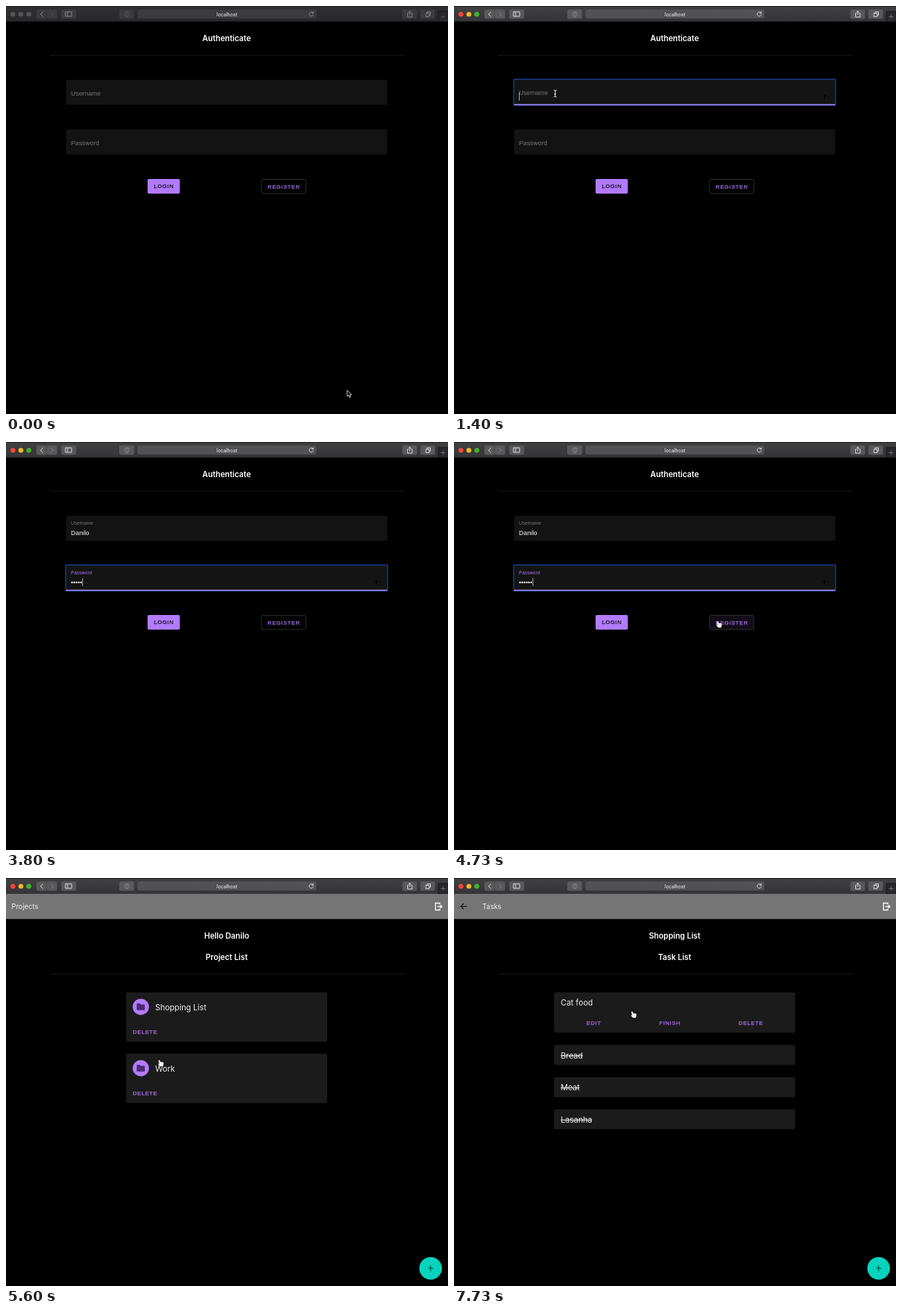
An HTML page that plays this animation: 640x592 px, repeating every 8 s.

```html
<!DOCTYPE html>
<html lang="en">
<head>
<meta charset="utf-8">
<title>Login and task list</title>
<style>
  html, body { margin: 0; width: 100%; height: 100%; overflow: hidden; background: #000; }
  svg { display: block; width: 640px; height: 592px; }
  text { font-family: Inter, sans-serif; fill: #fff; white-space: pre; }
  #bar { --bg1: #303033; --bg2: #29292b; --btn: #3b3b3d; --icon: #88888a; --url: #3c3c3e; }
  #bar.active { --bg1: #414144; --bg2: #343437; --btn: #59595b; --icon: #dededf; --url: #525255; }
  .btn { fill: var(--btn); }
  .icon { fill: none; stroke: var(--icon); stroke-width: 1; }
  .dim { opacity: .35; }
  .head { font-size: 11.3px; font-weight: 600; text-anchor: middle; }
  .title { font-size: 11.5px; fill: #eee; }
  .bartitle { font-size: 10.1px; fill: #f0f0f0; }
  .form { font: 9.33px "Liberation Sans", Arial, sans-serif; }
  .action { font: 8.1px "Liberation Sans", Arial, sans-serif; letter-spacing: .72px; fill: #a974ec; stroke: #a974ec; stroke-width: .25; }
  .mid { text-anchor: middle; }
  .done { text-decoration: line-through; }
</style>
</head>
<body>
<svg id="stage" viewBox="0 0 640 592"></svg>
<script>
const PURPLE = '#b27bff', LOOP = 8000, FPS = 15;
const $ = id => document.getElementById(id);
const rect = (x, y, w, h, fill, r = 0, more = '') =>
  `<rect x="${x}" y="${y}" width="${w}" height="${h}" rx="${r}" fill="${fill}" ${more}/>`;
const text = (x, y, cls, s, more = '') => `<text x="${x}" y="${y}" class="${cls}" ${more}>${s}</text>`;
const path = (d, cls = 'icon') => `<path d="${d}" class="${cls}"/>`;
const divider = y => rect(64, y, 512, 1, '#181818');
const card = (x, y, w, h) => rect(x, y, w, h, '#1b1b1b', 2);

const toolbar = () => `<g id="bar">
  <linearGradient id="shade" x2="0" y2="1">
    <stop style="stop-color:var(--bg1)"/><stop offset="1" style="stop-color:var(--bg2)"/>
  </linearGradient>
  ${rect(0, 0, 640, 22.5, 'url(#shade)')}${rect(0, 0, 640, 1, '#1c1c1e')}
  ${[10, 21.5, 33].map((x, i) => `<circle class="light" cx="${x}" cy="12" r="3.6" data-on="${['#f4453c', '#eeb526', '#43b32d'][i]}"/>`).join('')}
  ${[[44, 14.5], [59, 15], [80, 21.5], [164, 21.5], [574, 21], [600, 21]].map(([x, w]) => `<rect class="btn" x="${x}" y="5" width="${w}" height="13.5" rx="2"/>`).join('')}
  <rect x="190.5" y="5" width="259" height="13" rx="2.2" style="fill:var(--url)"/>
  ${path('M53.5 8.5 50 12l3.5 3.5')}${path('M65 8.5l3.5 3.5-3.5 3.5', 'icon dim')}
  ${path('M86 8.5h9v6.5h-9zM89 8.5v6.5')}
  ${path('M175 8.3l3 1v3q0 2.3-3 3.6q-3-1.3-3-3.6v-3zM175 8.5v7', 'icon dim')}
  ${path('M444.5 10a3 3 0 1 0 .5 2.2M445 8v2.4h-2.4')}
  ${path('M583 10.5h-1.5v5.5h6.5v-5.5h-1.5M584.7 13V7.5M582.8 9.2l1.9-1.9 1.9 1.9')}
  ${path('M608 10.5h4.8v5H608zM609.7 10.5v-2h4.8v5h-1.7')}
  ${rect(626, 8, 14, 14.5, '#29292b', 0, 'stroke="#171719"')}
  ${path('M629.5 15.5h7M633 12v7', 'icon dim')}
  ${text(320, 14.6, 'mid', 'localhost', 'font-size="7"')}
</g>`;

const field = (id, y) => `
  ${rect(87, y, 465, 36.5, '#131313', 1.5)}
  <g id="${id}Focus">
    <rect id="${id}Ring" fill="#141414" stroke="#15398b" stroke-width="1.6"/>
    <rect id="${id}Line" y="${y + 35.3}" height="1.7" fill="#9f85ef"/>
    <circle cx="536.5" cy="${y + 23.5}" r="1.8"/>
    <path d="M536.5 ${y + 24}v4M540.5 ${y + 23.5}l1.7 1.7 1.7-1.7" stroke="#000" fill="none"/>
  </g>
  ${text(0, 0, 'form', id, `id="${id}Label"`)}
  ${text(94, y + 27.7, 'form', '', `id="${id}Value"`)}
  <rect id="${id}Caret" y="${y + 18.5}" width=".8" height="11.5" fill="#ddd"/>`;

const loginPage = () => `<g id="login">
  ${text(319.5, 51.3, 'head', 'Authenticate')}${divider(71)}
  ${field('Username', 107)}${field('Password', 179)}
  ${rect(205, 251, 46.7, 21.3, PURPLE, 2, 'id="loginBtn"')}
  ${text(228.6, 264.3, 'action mid', 'LOGIN', 'style="fill:#100818;stroke:#100818"')}
  ${rect(370, 251.5, 64, 20.5, '#000', 2, 'id="registerBtn" stroke="#303030"')}
  ${text(402.4, 264.9, 'action mid', 'REGISTER')}
</g>`;

const project = (y, name) => `${card(174, y, 291, 71.5)}
  <circle cx="195.2" cy="${y + 21}" r="11.8" fill="${PURPLE}"/>
  <path d="M189.3 ${y + 17}q0-1 1-1h3.4l1.3 1.4h5q1 0 1 1v6.4q0 1-1 1h-9.7q-1 0-1-1z" fill="#4a2a70"/>
  ${text(216, y + 25.5, 'title', name)}${text(183.5, y + 59.8, 'action', 'DELETE')}`;

const appBar = (x, title) => `${rect(0, 22.5, 640, 37, '#757575')}
  ${text(x, 45.2, 'bartitle', title)}
  <path d="M628 38.5v-2h-6.3v10h6.3v-2M624.5 41.5h6.5M629 39.3l2.2 2.2-2.2 2.2" fill="none" stroke="#fff" stroke-width="1.3"/>`;
const heads = (a, b) => text(319.5, 88.4, 'head', a) + text(319.5, 119.4, 'head', b) + divider(139);
const fab = () => `<circle cx="614.8" cy="566.3" r="16.4" fill="#05d3bb"/>
  <path d="M610.7 566.3h8.2M614.8 562.2v8.2" stroke="#05453e" stroke-width="1.1"/>`;

const projectsPage = () => `<g id="projects">${appBar(8, 'Projects')}
  ${heads('Hello Danilo', 'Project List')}
  ${project(166, 'Shopping List')}${project(255, 'Work')}${fab()}</g>`;

const tasksPage = () => `<g id="tasks">${appBar(41, 'Tasks')}
  <path d="M18.8 41.3h-8.6M14 37.2l-4.1 4.1 4.1 4.1" fill="none" stroke="#111" stroke-width="1.3"/>
  ${heads('Shopping List', 'Task List')}
  ${card(145, 166, 349, 58.5)}${text(154.5, 185.2, 'title', 'Cat food')}
  ${[['EDIT', 202.5], ['FINISH', 312.7], ['DELETE', 430]].map(([s, x]) => text(x, 213.2, 'action mid', s)).join('')}
  ${['Bread', 'Meat', 'Lasanha'].map((s, i) => card(145, 242.3 + i * 46.6, 349, 29) + text(154.5, 261.6 + i * 46.6, 'title done', s)).join('')}
  ${fab()}</g>`;

// Pointer shapes are drawn around their hot spot.
const pointers = `<g id="pointer">
  <path id="arrow" d="M0 0v9l2.1-1.9 1.5 3.3 1.4-.6-1.4-3.2h2.9z" fill="#000" stroke="#fff" stroke-width=".8"/>
  <g id="beam" fill="none"><path d="M-2-5q2 0 2 1.5v7q0 1.5-2 1.5M2-5q-2 0-2 1.5v7q0 1.5 2 1.5M-1.2.8h2.4" stroke="#fff" stroke-width="1"/></g>
  <path id="hand" d="M-2.6-4.2q1-.7 1.5.4l.9 2.2 1.1-.3 1 .1.9.2q1.4.2 1.5 1.6l-.2 2.3-.8 2.7h-4.3l-2.6-3q-.8-1.1.2-1.4l1.2.5-1.2-4q-.2-.9.8-1.3z" fill="#fff" stroke="#222" stroke-width=".5"/>
</g>`;

$('stage').innerHTML = rect(0, 0, 640, 592, '#000') + loginPage() + projectsPage() + tasksPage() + toolbar() + pointers;

const clamp = v => Math.max(0, Math.min(1, v));
const ease = v => v * v * (3 - 2 * v);
const span = (t, from, to) => clamp((t - from) / (to - from));
const show = (id, on) => $(id).style.display = on ? '' : 'none';
const count = (t, times) => times.filter(x => t >= x - 5).length;

// time, x, y
const route = [
  [0, 494, 557.5], [333, 253, 165], [467, 253, 165], [800, 146.5, 127],
  [3867, 146.5, 127], [4000, 330, 239], [4133, 330, 239], [4533, 402, 264],
  [4667, 402, 264], [5000, 224, 268.5], [5933, 224, 268.5], [6333, 321, 236],
  [6667, 284, 190.5], [6800, 285, 192], [7133, 541, 50], [7533, 260, 198]
];
function pointerAt(t) {
  const i = route.findIndex(k => k[0] > t);
  if (i < 0) return route.at(-1).slice(1);
  const [t0, x0, y0] = route[i - 1], [t1, x1, y1] = route[i], p = ease(span(t, t0, t1));
  return [x0 + (x1 - x0) * p, y0 + (y1 - y0) * p];
}

function drawField(t, { id, y, focus, blur, float, value, blink }) {
  const focused = t >= focus && t < blur, p = ease(span(t, float, float + 210));
  const grow = 1.5 * (1 - span(t, focus, focus + 200)) + .6, wide = 465 * span(t, focus - 60, focus + 140);
  const set = (part, attrs) => Object.entries(attrs).forEach(([k, v]) => $(id + part).setAttribute(k, v));
  show(id + 'Focus', focused);
  set('Ring', { x: 87 - grow, y: y - grow, width: 465 + 2 * grow, height: 36.5 + 2 * grow, rx: 1.5 });
  set('Line', { x: 319.5 - wide / 2, width: wide });
  set('Label', { transform: `translate(94 ${y + 23 - 10.4 * p}) scale(${1 - .25 * p})` });
  $(id + 'Label').style.fill = focused && p > .4 ? '#a272e4' : '#777';
  $(id + 'Value').textContent = value;
  show(id + 'Caret', focused && !(t >= blink && t < blink + 195));
  set('Caret', { x: 94.2 + (value ? $(id + 'Value').getComputedTextLength() : 0) });
}

function draw(t) {
  const [x, y] = pointerAt(t);
  const within = (x0, y0, x1, y1) => x >= x0 && x <= x1 && y >= y0 && y <= y1;
  const page = t < 5595 ? 'login' : t < 7725 ? 'projects' : 'tasks';
  ['login', 'projects', 'tasks'].forEach(id => show(id, id === page));

  const active = t >= 725;
  $('bar').classList.toggle('active', active);
  document.querySelectorAll('.light').forEach(c => c.setAttribute('fill', active ? c.dataset.on : '#535355'));

  const typed = count(t, [1800, 2533, 2667, 2867, 2933, 3000]);
  const dots = count(t, [3467, 3533, 3600, 3733, 3800, 3867]);
  drawField(t, { id: 'Username', y: 107, focus: 1128, blur: 3195, float: 1360, value: 'Danilo'.slice(0, typed), blink: 2328 });
  drawField(t, { id: 'Password', y: 179, focus: 3195, blur: 5195, float: 3260, value: '•'.repeat(dots), blink: 4330 });

  const onLogin = page === 'login' && within(205, 251, 252, 272);
  const onRegister = page === 'login' && within(370, 251, 434, 272);
  $('loginBtn').setAttribute('fill', onLogin ? '#9a6cd9' : PURPLE);
  $('registerBtn').setAttribute('fill', onRegister ? '#110c18' : '#000');

  const onField = page === 'login' && (within(87, 107, 552, 144) || within(87, 179, 552, 216));
  const onCard = page === 'projects' && (within(174, 166, 465, 238) || within(174, 255, 465, 327));
  const kind = onField ? 'beam' : onLogin || onRegister || onCard || page === 'tasks' ? 'hand' : 'arrow';
  ['arrow', 'beam', 'hand'].forEach(id => show(id, id === kind));
  show('pointer', t < 1795 || t >= 3928);
  $('pointer').setAttribute('transform', `translate(${x} ${y})`);
}

function tick() {
  const t = performance.now() % LOOP;
  draw(Math.floor((t + 4) * FPS / 1000) * 1000 / FPS);
  requestAnimationFrame(tick);
}
tick();
</script>
</body>
</html>
```
